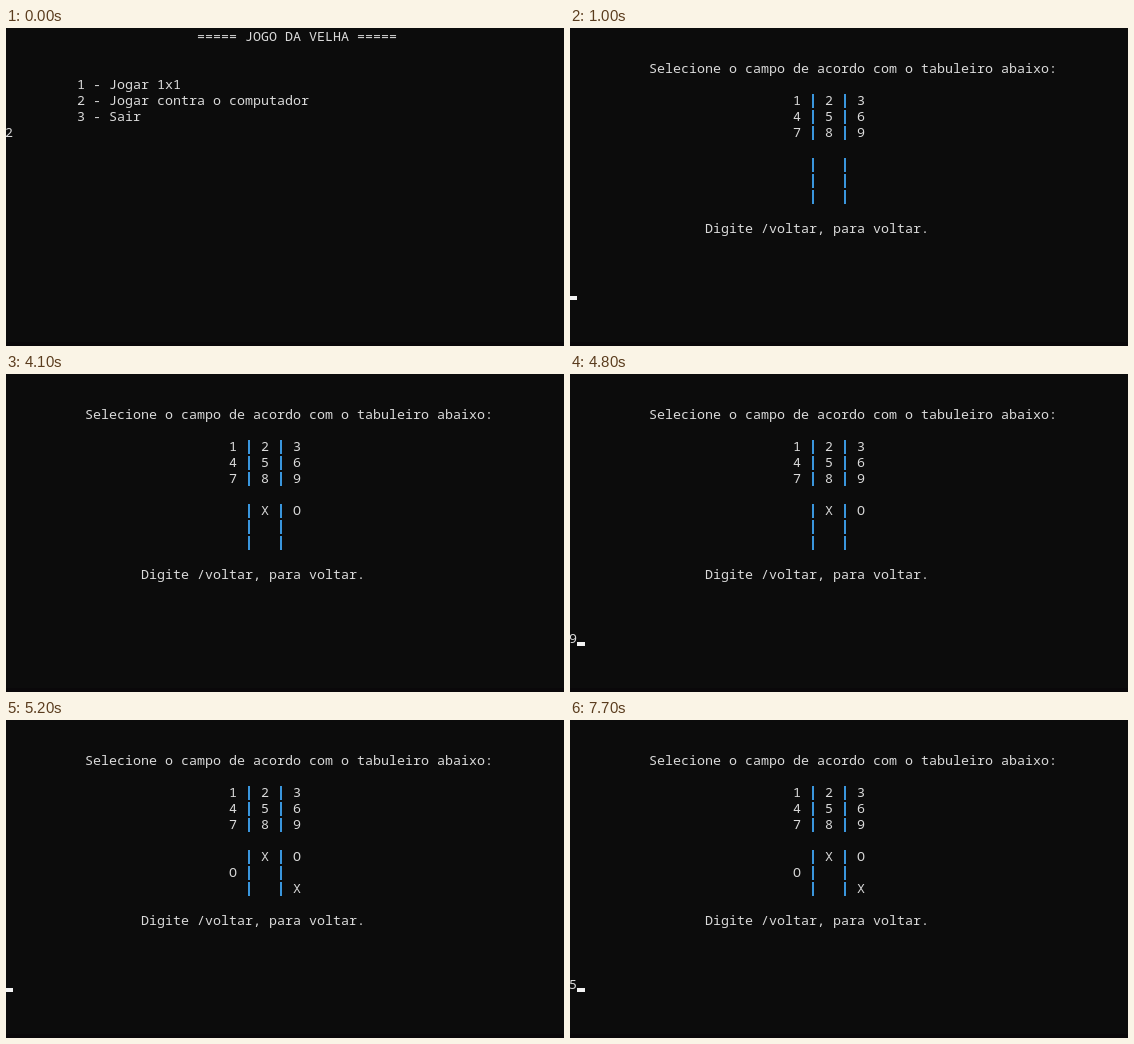
These frames come from a looping animation (558x318 px, 8 s). An HTML page with a canvas:

```html
<!DOCTYPE html>
<html lang="pt">
<head>
<meta charset="utf-8">
<title>Jogo da velha</title>
<style>
html, body { margin: 0; width: 100%; height: 100%; overflow: hidden; background: #0c0c0c; }
canvas { display: block; }
</style>
</head>
<body>
<canvas width="558" height="318"></canvas>
<script>
const ctx = document.querySelector('canvas').getContext('2d');
const CELL = 8, ROW = 16, LOOP = 8000;

// Each step: start time, screen, typed text, cursor as [column, row] or null.
const menu = 'menu', blank = 'blank';
const empty = ['   ', '   ', '   '];
const first = [' XO', '   ', '   '];
const second = [' XO', 'O  ', '  X'];
const steps = [
  [0, menu, '2', null],
  [700, menu, '2', [1, 6]],
  [900, blank, '', [0, 7]],
  [1000, empty, '', [0, 16]],
  [1700, empty, '', null],
  [2200, empty, '2', [1, 16]],
  [2500, first, '', [0, 16]],
  [3200, first, '', null],
  [3600, first, '', [0, 16]],
  [4100, first, '', null],
  [4600, first, '', [0, 16]],
  [4800, first, '9', [1, 16]],
  [5100, blank, '', [0, 17]],
  [5200, second, '', [0, 16]],
  [6000, second, '', null],
  [6500, second, '', [0, 16]],
  [7000, second, '', null],
  [7500, second, '', [0, 16]],
  [7700, second, '5', [1, 16]]
];

function rect(color, x, y, w, h) {
  ctx.fillStyle = color;
  ctx.fillRect(x, y, w, h);
}

function print(text, col, row) {
  [...text].forEach((ch, i) => {
    const x = (col + i) * CELL - 1, y = row * ROW;
    if (ch === '|') {
      rect('#3a96dd', x + 3, y + 2, 2, 14);
    } else {
      ctx.fillStyle = '#dadada';
      ctx.fillText(ch, x, y + 13);
    }
  });
}

function grid(rows, top) {
  rows.forEach((cells, i) => print([...cells].join(' | '), 28, top + i));
}

function draw(now) {
  const t = now % LOOP;
  const [, screen, typed, cursor] = steps.findLast(s => s[0] <= t);
  rect('#0c0c0c', 0, 0, 558, 318);
  rect('#0a080a', 0, 314, 558, 4);
  ctx.font = '500 13.333px "Noto Sans Mono", "DejaVu Sans Mono", monospace';

  if (screen === menu) {
    print('===== JOGO DA VELHA =====', 24, 0);
    print('1 - Jogar 1x1', 9, 3);
    print('2 - Jogar contra o computador', 9, 4);
    print('3 - Sair', 9, 5);
    print(typed, 0, 6);
  } else if (screen !== blank) {
    print('Selecione o campo de acordo com o tabuleiro abaixo:', 10, 2);
    grid(['123', '456', '789'], 4);
    grid(screen, 8);
    print('Digite /voltar, para voltar.', 17, 12);
    print(typed, 0, 16);
  }
  if (cursor) rect('#f2f2f2', cursor[0] * CELL - 1, cursor[1] * ROW + 12, CELL, 4);
}

const start = performance.now();
function tick() {
  draw(performance.now() - start);
  requestAnimationFrame(tick);
}
tick();
</script>
</body>
</html>
```
